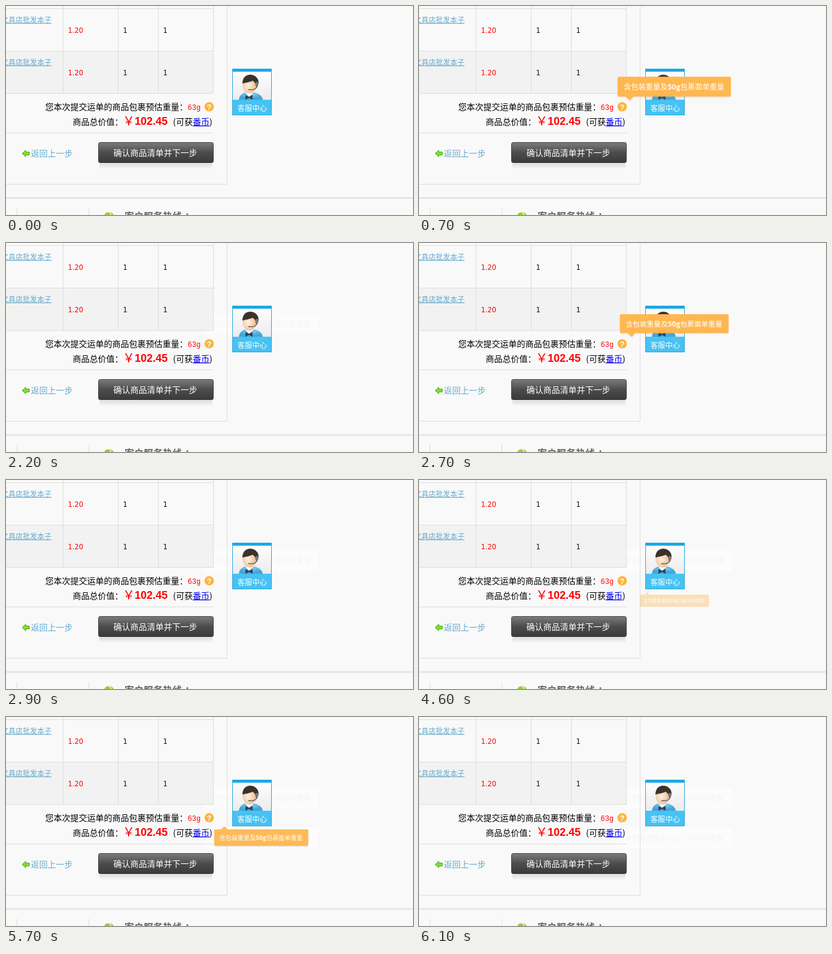
Write an HTML page that moves like this. It is 680x350 px and loops after 6.8 s.

```html
<!DOCTYPE html>
<html lang="zh-CN">
<head>
<meta charset="utf-8">
<style>
html, body { margin: 0; width: 100%; height: 100%; overflow: hidden; background: #f9f9f9; }
svg { display: block; }
text { font: 14px 'Noto Sans CJK SC', 'Noto Sans CJK', sans-serif; }
.small { font-size: 12px; }
.tip { font-size: 12.2px; }
.link { fill: #63aacd; }
.under { text-decoration: underline; }
.num { font: 11.5px 'DejaVu Sans', sans-serif; }
.red { fill: #f00; }
.white { fill: #fff; }
.rule { fill: none; stroke: #ddd; }
</style>
</head>
<body>
<svg width="680" height="350" viewBox="0 0 680 350">
  <defs>
    <linearGradient id="dark" x2="0" y2="1">
      <stop stop-color="#7c7c7c"/><stop offset=".5" stop-color="#4c4c4c"/>
      <stop offset="1" stop-color="#3a3a3a"/>
    </linearGradient>
    <linearGradient id="fade" x2="0" y2="1">
      <stop stop-color="#ddd"/><stop offset="1" stop-color="#f9f9f9"/>
    </linearGradient>
    <linearGradient id="paper" x2="0" y2="1">
      <stop stop-color="#fff"/><stop offset="1" stop-color="#e2e2e2"/>
    </linearGradient>
    <radialGradient id="shirt" cy=".3">
      <stop stop-color="#8bd2f4"/><stop offset="1" stop-color="#45a5d8"/>
    </radialGradient>
    <radialGradient id="skin" cx=".4" cy=".5">
      <stop stop-color="#fff1e2"/><stop offset="1" stop-color="#eec39c"/>
    </radialGradient>
    <filter id="shadow" x="-5%" y="-20%" width="110%" height="140%">
      <feDropShadow dx="0" dy="1" stdDeviation="1" flood-color="#a87" flood-opacity=".35"/>
    </filter>
  </defs>

  <g id="traces"></g>

  <!-- goods table -->
  <path fill="#f9f9f9" d="M0 0H346V76H0z"/>
  <path fill="#f2f2f2" d="M0 76H346V146H0z"/>
  <path class="rule" d="M0 4.5H347M0 75.5H347M0 146.5H347M95.5 0V146M187.5 0V146M254.5 0V146M346.5 0V146"/>
  <g id="row">
    <text class="small link under" x="-8" y="27.5">文具店批发本子</text>
    <text class="num red" x="103.5" y="45">1.20</text>
    <text class="num" x="195.5" y="45" fill="#020">1</text>
    <text class="num" x="262.5" y="45" fill="#202">1</text>
  </g>
  <use href="#row" y="71"/>

  <!-- totals -->
  <text x="65.5" y="174">您本次提交运单的商品包裹预估重量：</text>
  <text x="303.5" y="174" class="red" style="font:12px 'Liberation Mono',monospace">63g</text>
  <circle cx="339.5" cy="168.8" r="7.8" fill="#fdb43c"/>
  <text class="white" x="339.5" y="173.5" text-anchor="middle" style="font:bold 13px 'Liberation Sans',sans-serif">?</text>
  <text x="111.5" y="199">商品总价值：</text>
  <text class="red" x="195" y="200" style="font-size:20px">￥</text>
  <text class="red" x="215" y="199" style="font:bold 18px 'Liberation Sans',sans-serif">102.45</text>
  <text x="279" y="199">(</text>
  <text x="284" y="199">可获</text>
  <text class="under" x="312" y="199" fill="#00e">番币</text>
  <text x="340" y="199">)</text>
  <path class="rule" d="M0 212.5H347"/>

  <!-- actions -->
  <path d="M27 247l6-5.500v3H39v5h-6V252.500z" fill="#7fe02f" stroke="#4aa51c" stroke-linejoin="round"/>
  <text class="link" x="41.500" y="252">返回上一步</text>
  <rect x="156" y="264" width="189" height="9" fill="url(#fade)"/>
  <rect x="154.500" y="228.500" width="192" height="34" rx="3" fill="url(#dark)" stroke="#444"/>
  <text class="white" x="179.500" y="251">确认商品清单并下一步</text>
  <path class="rule" d="M369.500 0V298.500H0"/>

  <!-- footer -->
  <path fill="#e6e6e6" d="M0 320H680V323H0z"/>
  <path class="rule" d="M18.500 338V350M138.500 338V350"/>
  <ellipse cx="172" cy="352" rx="8" ry="7" fill="#9c3"/>
  <path d="M171 345q5 1 4 6" fill="none" stroke="#e6f3b5" stroke-width="2"/>
  <text x="198" y="357.500" fill="#666" style="font-size:16px;font-weight:bold">客户服务热线<tspan dx="5">：</tspan></text>

  <!-- service badge -->
  <path d="M378.500 105.500H443.500V182.500H378.500z" fill="url(#paper)" stroke="#27a5dc"/>
  <path fill="#1ba8e6" d="M378 105H444V110H378z"/>
  <path fill="#46c2f3" d="M379 157H443V182H379z"/>
  <path d="M389 157c1-9 8-13 18-13s21 4 22 13z" fill="url(#shirt)"/>
  <path d="M399 144l7 8 10-9z" fill="#fff"/>
  <ellipse cx="407" cy="133" rx="11.500" ry="13.500" fill="url(#skin)"/>
  <path d="M395 130c0-10 6-15 13-15 8 0 14 6 14 13-1 5-2 8-4 9 0-6-2-9-6-12-5 3-11 3-17 5z" fill="#3b322c"/>
  <path d="M420 131q0 11-15 9" fill="none" stroke="#555" stroke-width="1.300"/>
  <ellipse cx="419" cy="131" rx="2.500" ry="4" fill="#777"/>
  <path d="M400 149l6 3 6-3v8l-6-3-6 3z" fill="#345"/>
  <text class="white" x="386.800" y="176" style="font-size:12.300px">客服中心</text>

  <g id="tips"></g>
</svg>
<script>
const LOOP = 6800, STEP = 100, CX = 426.5;
const GROW = [.61, .83, .96, 1], ALPHA = [.38, .95, 1, 1];
const $ = id => document.getElementById(id);

// Each show: start, end, and how many growth steps it skips.
const tips = [
  { cy: 135, dir: 1, shows: [[400, 1000, 0], [1700, 2200, 0], [2600, 2900, 1]] },
  { cy: 202, dir: -1, shows: [[4600, 5200, 0], [5700, 6100, 1]] }
];

const label = (fill, weight) =>
  `<text class="tip" x="-.5" y="5" text-anchor="middle" fill="${fill}">含包装重量及` +
  `<tspan style="font-weight:${weight}">50g</tspan>包裹面单重量</text>`;

function add(parent, tip, html) {
  const g = document.createElementNS('http://www.w3.org/2000/svg', 'g');
  g.innerHTML = html;
  g.setAttribute('transform', `translate(${CX} ${tip.cy})`);
  $(parent).append(g);
  return g;
}

for (const tip of tips) {
  tip.trace = add('traces', tip,
    '<rect x="-95.500" y="-17" width="192" height="35.500" rx="3" fill="#fff" opacity=".6"/>' +
    label('#f5f5f5', 400));
  const base = 16 * tip.dir, point = 23 * tip.dir;
  tip.node = add('tips', tip,
    `<g filter="url(#shadow)" fill="#ffb74f"><rect x="-94.500" y="-16.500" width="189" height="33" rx="2"/>` +
    `<path d="M-82 ${base}L-74 ${point}L-68 ${base}z"/></g>` + label('#fff', 700));
}

function draw(now) {
  const t = now % LOOP;
  for (const { cy, shows, node, trace } of tips) {
    const show = shows.find(([from, to]) => t >= from && t < to);
    node.style.display = show ? '' : 'none';
    // A pale trace stays behind once the tip has been closed.
    trace.style.display = t >= shows[0][1] ? '' : 'none';
    if (!show) continue;
    const i = Math.min(3, Math.floor((t - show[0]) / STEP) + show[2]);
    node.setAttribute('transform', `translate(${CX} ${cy}) scale(${GROW[i]})`);
    node.setAttribute('opacity', ALPHA[i]);
  }
}

const start = performance.now();
function tick() {
  draw(performance.now() - start);
  requestAnimationFrame(tick);
}
tick();
</script>
</body>
</html>
```
